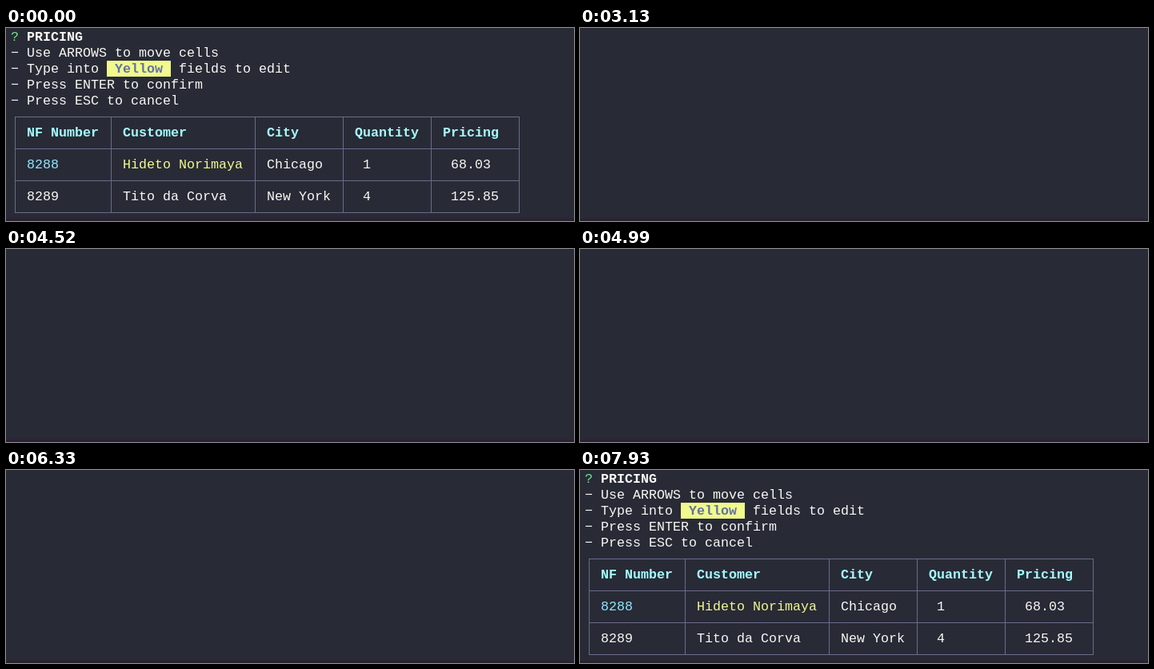
Animation of 710 by 242 pixels, one loop 8000 ms. Source, as an HTML page:

```html
<!DOCTYPE html>
<html lang="en">
<head>
<meta charset="utf-8">
<title>Pricing table</title>
<style>
  :root { --bg: #282a36; --fg: #f8f8f2; --cyan: #8be9fd; --yellow: #f1fa8c; }
  html, body { margin: 0; width: 100%; height: 100%; overflow: hidden; background: var(--bg); }
  svg { display: block; width: 710px; height: 242px; }
  text { font: 16.667px "Liberation Mono", monospace; fill: var(--fg); white-space: pre; }
  .bold { font-weight: bold; }
  .ask { fill: #69e884; }
  .head text { font-weight: bold; fill: #a4ffff; }
  .grid { fill: none; stroke: #6b6d8a; shape-rendering: crispEdges; }
  .badge rect { fill: var(--yellow); }
  .badge text { fill: #6272a4; font-weight: bold; }

  #screen, .cell { animation: 8s step-end infinite; }
  #screen { animation-name: redraw; }
  #id1 { fill: var(--cyan); animation-name: id1; }
  #id2 { animation-name: id2; }
  #customer1 { fill: var(--yellow); animation-name: customer1; }
  #customer2 { animation-name: customer2; }
  #city1 { animation-name: city1; }
  #city2 { animation-name: city2; }
  #quantity { opacity: 0; animation-name: quantity; }
  #pricing { opacity: 0; animation-name: pricing; }

  /* The terminal clears briefly before some redraws. */
  @keyframes redraw {
    0%, 40%, 57.375%, 63.25%, 71.5%, 80% { opacity: 1; }
    39.125%, 56.5%, 62.375%, 70.625%, 79.125% { opacity: 0; }
  }
  @keyframes id1 {
    0%, 99.125% { fill: var(--cyan); }
    86.625% { fill: var(--fg); }
  }
  @keyframes id2 {
    0%, 99.125% { fill: var(--fg); }
    86.625% { fill: var(--cyan); }
  }
  @keyframes customer1 {
    0%, 57.375%, 75%, 99.125% { fill: var(--yellow); }
    40%, 63.25%, 80% { fill: var(--fg); }
  }
  @keyframes city1 {
    0%, 45%, 57.375%, 66.5%, 86.625% { fill: var(--fg); }
    40%, 50.75%, 63.25%, 80% { fill: var(--yellow); }
  }
  @keyframes quantity {
    0%, 50.75%, 71.5% { opacity: 0; }
    45%, 66.5% { opacity: 1; }
  }
  @keyframes pricing {
    0%, 75% { opacity: 0; }
    71.5% { opacity: 1; }
  }
  @keyframes city2 {
    0%, 94.125% { fill: var(--fg); }
    86.625% { fill: var(--yellow); }
  }
  @keyframes customer2 {
    0%, 99.125% { fill: var(--fg); }
    94.125% { fill: var(--yellow); }
  }
</style>
</head>
<body>
<svg viewBox="0 0 710 242">
  <rect width="710" height="242" fill="#282a36"/>
  <rect y="239" width="710" height="3" fill="#2c2033"/>
  <g id="screen">
    <text class="ask" x="6" y="16">?</text>
    <text class="bold" x="26" y="16">PRICING</text>
    <text x="6" y="36">− Use ARROWS to move cells</text>
    <text x="6" y="56">− Type into</text>
    <g class="badge">
      <rect x="126" y="41" width="80" height="20"/>
      <text x="136" y="56">Yellow</text>
    </g>
    <text x="216" y="56">fields to edit</text>
    <text x="6" y="76">− Press ENTER to confirm</text>
    <text x="6" y="96">− Press ESC to cancel</text>

    <path class="grid" d="M11 111.5H642M11 151.5H642M11 191.5H642M11 231.5H642
      M11.5 111V232M131.5 111V232M311.5 111V232M421.5 111V232M531.5 111V232M641.5 111V232"/>

    <g class="head">
      <text x="26" y="136">NF Number</text>
      <text x="146" y="136">Customer</text>
      <text x="326" y="136">City</text>
      <text x="436" y="136">Quantity</text>
      <text x="546" y="136">Pricing</text>
    </g>

    <text class="cell" id="id1" x="26" y="176">8288</text>
    <text class="cell" id="customer1" x="146" y="176">Hideto Norimaya</text>
    <text class="cell" id="city1" x="326" y="176">Chicago</text>
    <text x="446" y="176">1</text>
    <text x="556" y="176">68.03</text>

    <text class="cell" id="id2" x="26" y="216">8289</text>
    <text class="cell" id="customer2" x="146" y="216">Tito da Corva</text>
    <text class="cell" id="city2" x="326" y="216">New York</text>
    <text x="446" y="216">4</text>
    <text x="556" y="216">125.85</text>

    <g class="cell badge" id="quantity">
      <rect x="436" y="161" width="30" height="20"/>
      <text x="446" y="176">1</text>
    </g>
    <g class="cell badge" id="pricing">
      <rect x="546" y="161" width="70" height="20"/>
      <text x="556" y="176">68.03</text>
    </g>
  </g>
</svg>
</body>
</html>
```
